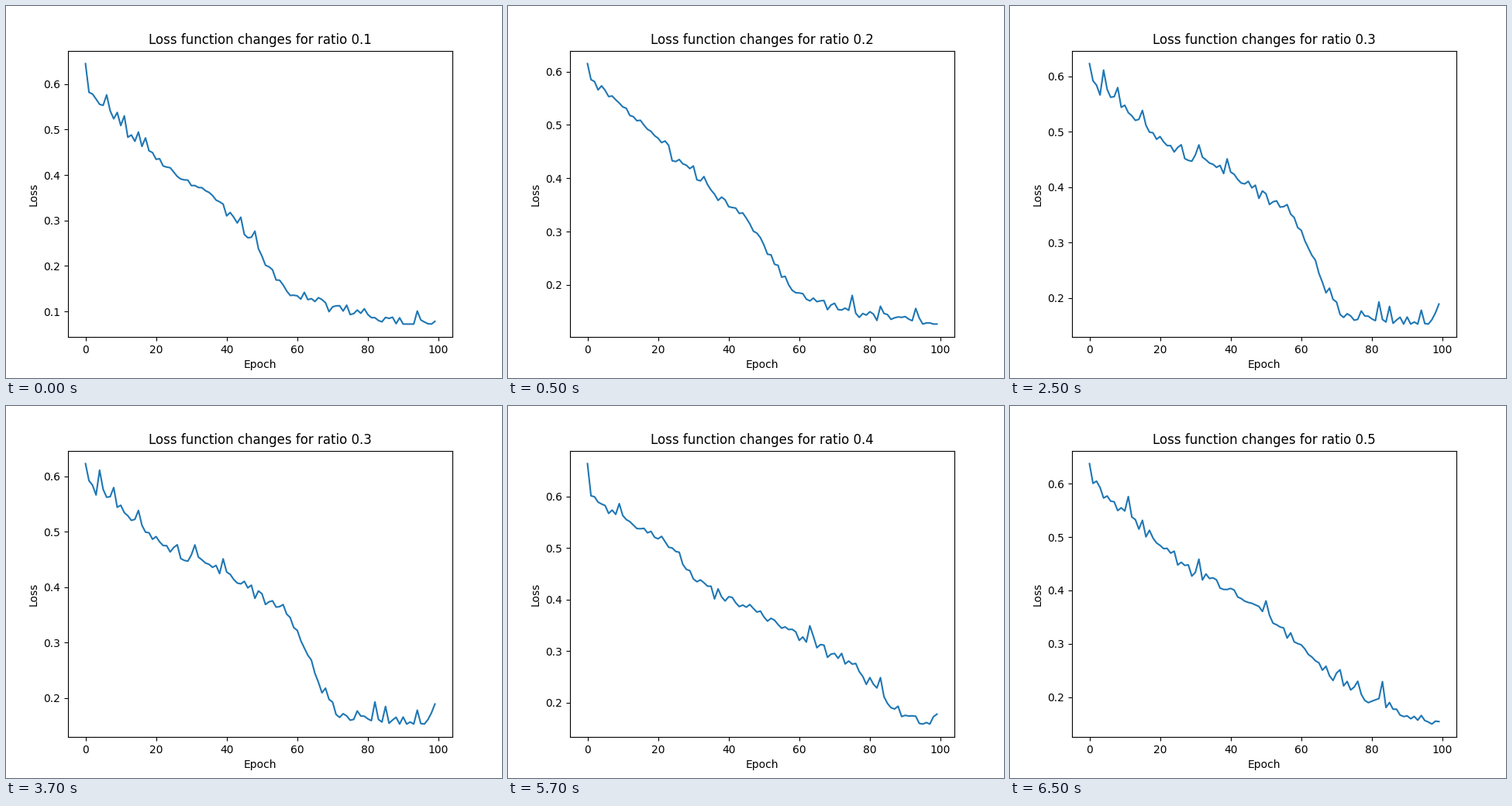
A matplotlib script for the animation above (8 s loop, 640 px wide and 480 px high).

```python
import matplotlib.pyplot as plt
import numpy as np
from matplotlib.animation import FuncAnimation

EPOCHS = np.arange(100)
JITTER = 0.006
SPIKE_CHANCE, SPIKE_HEIGHT = 0.07, 0.025

# Key points (epoch, loss) of each run, among them its highest and lowest loss.
RUNS = {
    0.1: [(0, .645), (1, .582), (22, .42), (36, .355), (46, .262),
          (57, .145), (70, .11), (91, .0722), (99, .078)],
    0.2: [(0, .6149), (1, .585), (18, .488), (35, .378), (44, .335),
          (58, .19), (72, .153), (99, .1267)],
    0.3: [(0, .6228), (1, .592), (22, .475), (41, .423), (58, .345),
          (71, .17), (96, .1528), (99, .189)],
    0.4: [(0, .6633), (1, .601), (24, .5), (30, .44), (57, .342),
          (75, .275), (87, .188), (97, .1588), (99, .178)],
    0.5: [(0, .6379), (1, .601), (27, .447), (48, .37), (62, .28),
          (72, .221), (97, .1493), (99, .154)],
}


def loss_curve(points, seed):
    """Join the key points and roughen the line between them."""
    epochs, losses = zip(*points)
    rng = np.random.default_rng(seed)
    noise = rng.normal(0, JITTER, EPOCHS.size)
    noise += SPIKE_HEIGHT * (rng.random(EPOCHS.size) < SPIKE_CHANCE)
    noise[list(epochs)] = 0
    trend = np.interp(EPOCHS, epochs, losses)
    return (trend + noise).clip(min(losses), max(losses))


curves = [(ratio, loss_curve(points, seed))
          for seed, (ratio, points) in enumerate(RUNS.items())]

fig, ax = plt.subplots(figsize=(6.4, 4.8), dpi=100)
line, = ax.plot(EPOCHS, curves[0][1])
ax.set_xlabel("Epoch")
ax.set_ylabel("Loss")


def draw(step):
    # The first run is shown for one step, the following ones for up to four.
    ratio, loss = curves[(step + 3) // 4]
    line.set_ydata(loss)
    ax.relim()
    ax.autoscale_view()
    ax.set_title(f"Loss function changes for ratio {ratio}")
    return line,


anim = FuncAnimation(fig, draw, frames=16, interval=500, repeat=True, repeat_delay=0)
plt.show()
```
